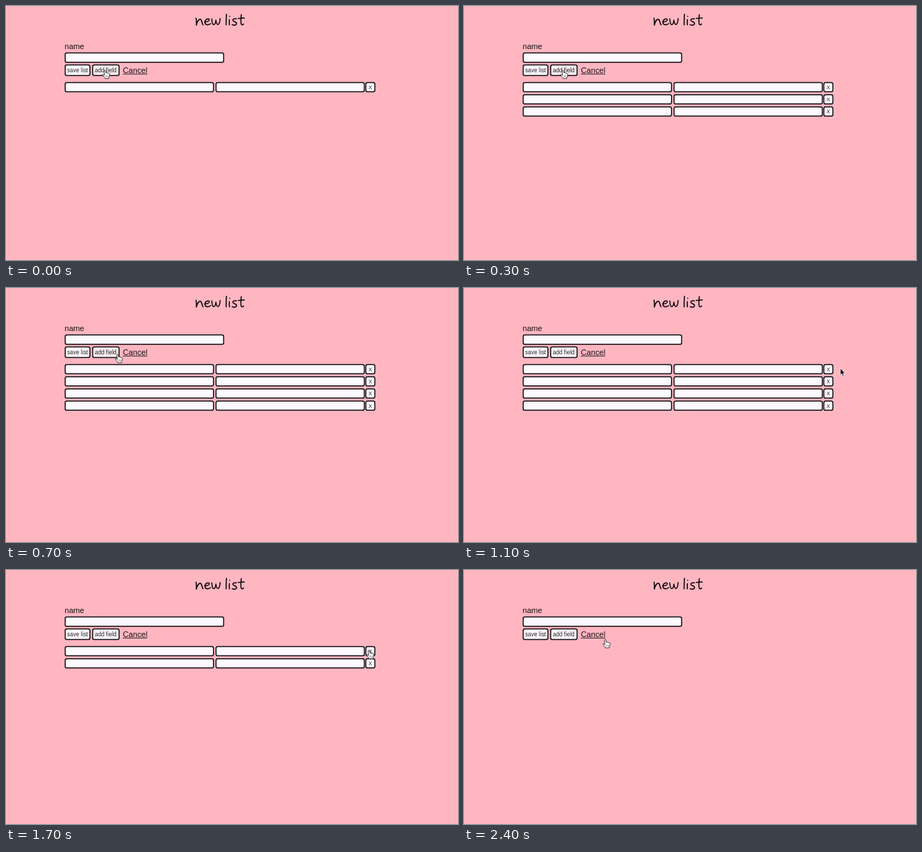
An HTML page for the animation above (2500 ms loop, 640x360 px).

```html
<!DOCTYPE html>
<html lang="en">
<head>
<meta charset="utf-8">
<title>new list</title>
<style>
  html, body { margin: 0; width: 100%; height: 100%; overflow: hidden; background: #ffb6c1; }
  svg { display: block; width: 640px; height: 360px; }
  text { font-family: "Liberation Sans", Arial, sans-serif; fill: #151214; }
  .box { fill: #fcf9ff; stroke: #151114; stroke-width: 1.5; }
  .box.hover { fill: #faeef2; }
  .label { font-size: 11.1px; }
  .button { font-size: 8.2px; fill: #29262a; }
  .remove { font-size: 7.6px; text-anchor: middle; fill: #29262a; }
  .script { fill: none; stroke: #0c080a; stroke-width: 1.55; stroke-linecap: round; stroke-linejoin: round; }
  .cursor { stroke-linejoin: round; stroke-linecap: round; }
</style>
</head>
<body>
<svg id="stage" viewBox="0 0 640 360">
  <g class="script" role="img" aria-label="new list">
    <path d="M269.2 17.2C269.6 20.5 269.7 23.5 269.5 27C270.6 22.6 273 18.6 275.2 18.8C277.4 19.1 277.2 24.4 279 26.6"/>
    <path d="M281.2 22.5C284.4 22.7 288 21.6 287.8 19.4C287.5 17 282.2 18.2 281.7 22.6C281.4 27.4 286.8 27.4 289.8 25"/>
    <path d="M291.4 18.2C291.6 22 292.4 26.4 294.3 26.4C296.1 26.3 297 22.4 297.2 20C297.6 23 298.6 26.5 300.2 26.3C302.2 25.8 303 21.2 303.2 17.8"/>
    <path d="M312.2 11.8C311.8 17 311.5 22 311.7 26.8"/>
    <path d="M316.3 19.2C316.1 22 316.1 24.4 316.3 26.7M316.7 14.5V14.8"/>
    <path d="M326.2 18.2C323.4 17.6 320.6 18.8 321.2 20.5C321.9 22.3 326.8 22.4 326.5 25C326.1 27.6 322.6 27.6 320.2 26.5"/>
    <path d="M333.2 12.2C332.7 17 332 22.2 333 25.5C333.7 27.4 335.4 26.6 336.4 25.6M328.9 17.6C332 17.2 334.6 17 337.4 17.1"/>
  </g>
</svg>
<script>
const NS = 'http://www.w3.org/2000/svg';
const stage = document.getElementById('stage');
const LOOP = 2500, STEP = 100;

function add(tag, attrs, parent = stage, content = '') {
  const el = document.createElementNS(NS, tag);
  for (const key in attrs) el.setAttribute(key, attrs[key]);
  el.textContent = content;
  parent.append(el);
  return el;
}

const box = (x, y, width, height, parent) =>
  add('rect', { class: 'box', x, y, width, height, rx: 2.4 }, parent);
const text = (kind, x, y, content, parent) =>
  add('text', { class: kind, x, y }, parent, content);

text('label', 83, 61.3, 'name');
box(83.8, 66.6, 224.4, 13.2);
box(83.8, 83.6, 35, 15);
text('button', 86.5, 94.4, 'save list');
const addButton = box(122.7, 83.6, 37.4, 15);
text('button', 125.7, 94.4, 'add field');
text('label', 165.6, 94.6, 'Cancel');
add('path', { d: 'M165.6 96.4H200', stroke: '#151214', 'stroke-width': 0.9 });

const rows = Array.from({ length: 4 }, (_, i) => {
  const group = add('g', { transform: `translate(0 ${i * 17.25})` });
  box(83.8, 108.4, 210, 13.2, group);
  box(297.4, 108.4, 210, 13.2, group);
  const button = box(509.5, 108.4, 12.8, 13.2, group);
  text('remove', 515.7, 117.8, 'X', group);
  return { group, button };
});

// Both pointers have their hot spot at the origin.
const arrow = add('path', {
  class: 'cursor', fill: '#0d090b', stroke: '#fff', 'stroke-width': 0.6,
  d: 'M0 0V9.2L2 7.4L3.5 10.8L5 10.1L3.5 6.9H6.2Z'
});
const hand = add('g', { class: 'cursor' });
add('path', {
  fill: '#fff', stroke: '#1a1618', 'stroke-width': 0.8,
  d: 'M-1 .7C-.8-.5 .7-.4 .9.8L1.5 4C2-.1 3.3 3.1 3.4 4.3C4-.1 5.2 4 5.3 5C6.4 4.3 7 5.2 6.8 6.7C6.7 9 5.6 10 5.5 11.8H.3C-.2 10-2.4 8.5-3.2 6.7C-3.3 5.6-1.9 5.6-.8 7Z'
    .replace('C2-.1 3.3 3.1', 'C1.9 2.8 3.2 3.1').replace('C4-.1 5.2 4', 'C4 3.5 5.2 4')
}, hand);
add('path', {
  fill: 'none', stroke: '#4a4448', 'stroke-width': 0.5,
  d: 'M1.3 7.6V9.7M2.9 7.6V9.7M4.5 7.6V9.7'
}, hand);

// [time, value] changes of the row count
const counts = [[0, 1], [100, 2], [300, 3], [400, 4], [1400, 3], [1600, 2], [1800, 1], [2100, 0]];

// [time, x, y] stops of the pointer
const path = [
  [0, 140, 91], [600, 140, 91], [700, 158, 94], [800, 245, 103],
  [900, 370, 111], [1000, 485, 115], [1100, 533, 114], [1200, 514, 114],
  [2100, 514, 114], [2200, 432, 111], [2300, 292, 102], [2400, 200, 98.5]
];

function pointerAt(t) {
  const next = path.findIndex(stop => stop[0] > t);
  if (next < 0) return path.at(-1).slice(1);
  const [t0, x0, y0] = path[next - 1], [t1, x1, y1] = path[next];
  const k = (t - t0) / (t1 - t0);
  return [x0 + (x1 - x0) * k, y0 + (y1 - y0) * k];
}

function draw(time) {
  const t = Math.floor((time % LOOP) / STEP) * STEP;
  const count = counts.findLast(([start]) => start <= t)[1];
  const [x, y] = pointerAt(t);
  const onAdd = x > 122 && x < 161 && y < 99;
  const onRemove = count > 0 && x > 509 && x < 523;
  const onLink = x > 165 && x < 202 && y < 99;
  const pressing = onAdd || onRemove || onLink;

  rows.forEach(({ group, button }, i) => {
    group.style.display = i < count ? '' : 'none';
    button.classList.toggle('hover', i === 0 && onRemove);
  });
  addButton.classList.toggle('hover', onAdd);
  hand.style.display = pressing ? '' : 'none';
  arrow.style.display = pressing ? 'none' : '';
  for (const el of [hand, arrow]) el.setAttribute('transform', `translate(${x} ${y})`);
}

const start = performance.now();
function frame() {
  draw(performance.now() - start);
  requestAnimationFrame(frame);
}
frame();
</script>
</body>
</html>
```
